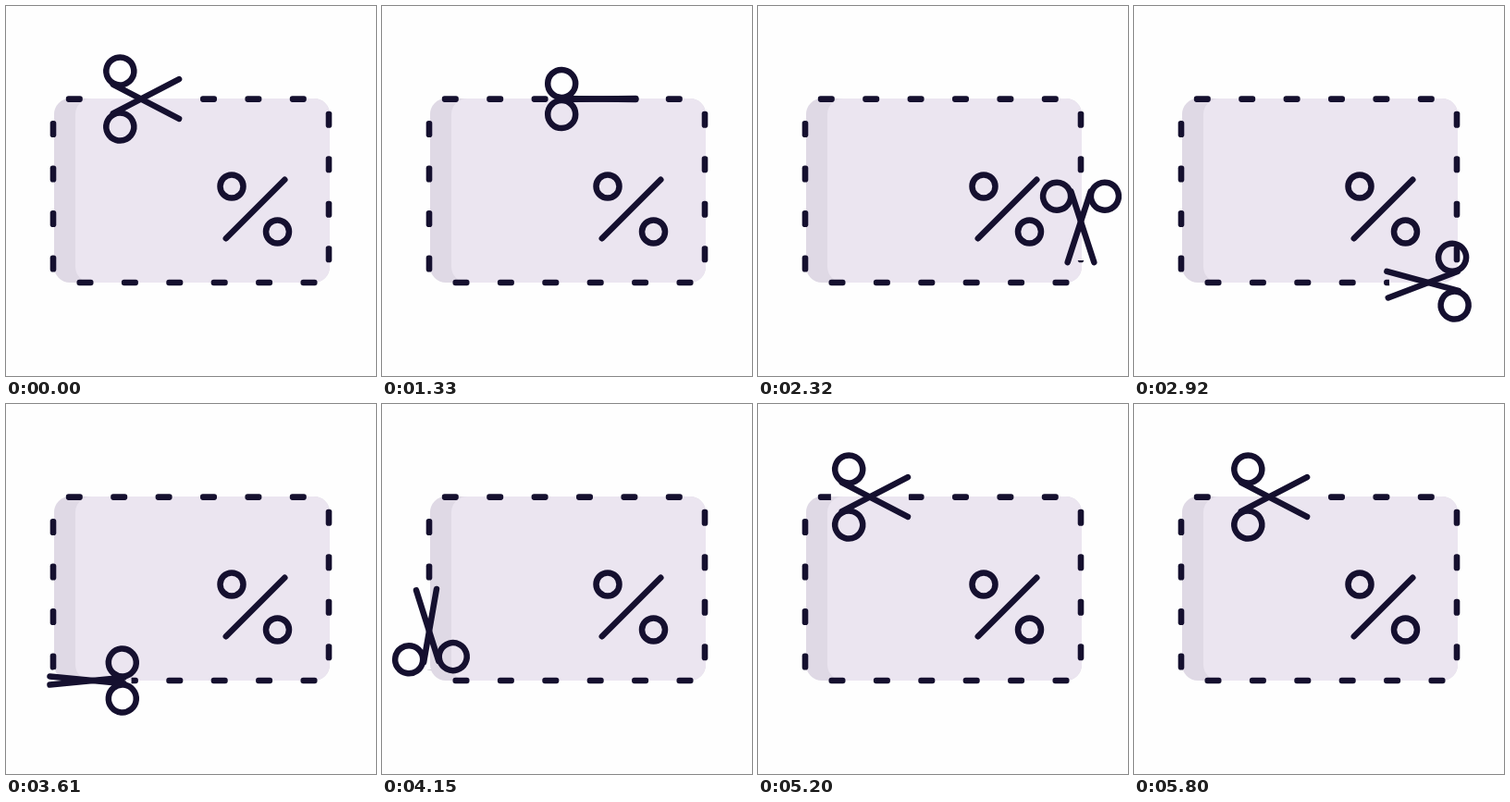
An HTML page that plays this animation: 400x400 px, repeating every 5.83 s.

```html
<!DOCTYPE html>
<html lang="en">
<head>
<meta charset="utf-8">
<title>Coupon</title>
<style>
  html, body { margin: 0; width: 100%; height: 100%; overflow: hidden; background: #fefefe; }
  svg { display: block; width: 100vw; height: 100vh; }
  .line { fill: none; stroke: #15102f; stroke-width: 6.5; stroke-linecap: round; }
</style>
</head>
<body>
<svg viewBox="0 0 400 400">
  <defs>
    <path id="route" d="M146 100.5H331A18 18 0 0 1 349 118.5V281A18 18 0 0 1 331 299H69A18 18 0 0 1 51 281V118.5A18 18 0 0 1 69 100.5H146"/>
    <mask id="cut" maskUnits="userSpaceOnUse" x="0" y="0" width="400" height="400">
      <rect width="400" height="400" fill="#fff"/>
      <rect id="gap" x="-42" y="-12" width="84" height="24"/>
    </mask>
    <g id="half">
      <path d="M46.3 0H-34"/>
      <circle cx="-34" cy="16.2" r="15"/>
    </g>
  </defs>
  <rect x="52" y="100" width="298" height="199" rx="17" fill="#dfd9e5"/>
  <rect x="75" y="100" width="275" height="199" rx="17" fill="#ebe5f0"/>
  <g class="line">
    <circle cx="244" cy="195" r="12.5"/>
    <circle cx="293.5" cy="244" r="12.5"/>
    <path d="M301.3 187.8L237.8 251.3"/>
  </g>
  <g mask="url(#cut)"><g id="dashes" fill="#15102f"></g></g>
  <g id="scissors" class="line">
    <use id="bladeA" href="#half"/>
    <use id="bladeB" href="#half"/>
  </g>
</svg>
<script>
const $ = id => document.getElementById(id);
const LOOP = 5830, START = 1000, END = 5800, CUT = 600, TURN = 620;

// Time in ms and distance travelled along the route.
const keys = [
  [1000, 0], [1330, 82], [1600, 185.5], [1750, 203], [2200, 293.8], [2320, 327.8],
  [2665, 386], [2800, 393.4], [2920, 417], [3400, 572.5], [3610, 641.5], [3830, 677],
  [4000, 691.3], [4300, 779], [4600, 856.8], [4660, 864.5], [4780, 875], [5200, 937],
  [5420, 959], [5800, 962.1]
];
const turns = [1770, 2680, 3922, 4748];

// Monotone cubic slopes, at rest on both ends.
const rate = i => (keys[i + 1][1] - keys[i][1]) / (keys[i + 1][0] - keys[i][0]);
const slopes = keys.map((_, i) => {
  if (i === 0 || i === keys.length - 1) return 0;
  const a = rate(i - 1), b = rate(i);
  return 2 * a * b / (a + b);
});

function distance(t) {
  let i = 0;
  while (i < keys.length - 2 && t > keys[i + 1][0]) i++;
  const [t0, s0] = keys[i], [t1, s1] = keys[i + 1];
  const h = t1 - t0, u = (t - t0) / h, v = 1 - u;
  return s0 + (s1 - s0) * u * u * (3 - 2 * u)
    + h * u * v * (slopes[i] * v - slopes[i + 1] * u);
}

const ease = u => (1 - Math.cos(Math.PI * Math.min(1, Math.max(0, u)))) / 2;
const heading = t => turns.reduce((sum, mid) => sum + 90 * ease((t - mid) / TURN + 0.5), 0);
const opening = t => 13.75 * (1 + Math.cos(2 * Math.PI * (t - START) / CUT));

function addDash(x, y, w, h) {
  const r = document.createElementNS('http://www.w3.org/2000/svg', 'rect');
  const box = { x: x - w / 2, y: y - h / 2, width: w, height: h, rx: 2.8 };
  for (const k in box) r.setAttribute(k, box[k]);
  $('dashes').append(r);
}
for (let i = 0; i < 6; i++) {
  addDash(73.8 + 48.4 * i, 100.6, 18, 6.6);
  addDash(85.5 + 48.4 * i, 299, 18, 6.6);
}
for (let i = 0; i < 4; i++) {
  addDash(349, 122.7 + 48.5 * i, 6.6, 18);
  addDash(51, 133 + 48.5 * i, 6.6, 18);
}

function draw(time) {
  const step = Math.floor((time % LOOP - 10) / 30) * 30 + 10;
  const t = Math.min(END, Math.max(START, step));
  const p = $('route').getPointAtLength(distance(t));
  const pose = `translate(${p.x} ${p.y}) rotate(${heading(t)})`;
  const angle = opening(t);
  $('scissors').setAttribute('transform', pose);
  $('gap').setAttribute('transform', pose);
  $('bladeA').setAttribute('transform', `rotate(${-angle})`);
  $('bladeB').setAttribute('transform', `scale(1 -1) rotate(${-angle})`);
}

const begin = performance.now();
function tick() {
  draw(performance.now() - begin);
  requestAnimationFrame(tick);
}
tick();
</script>
</body>
</html>
```
